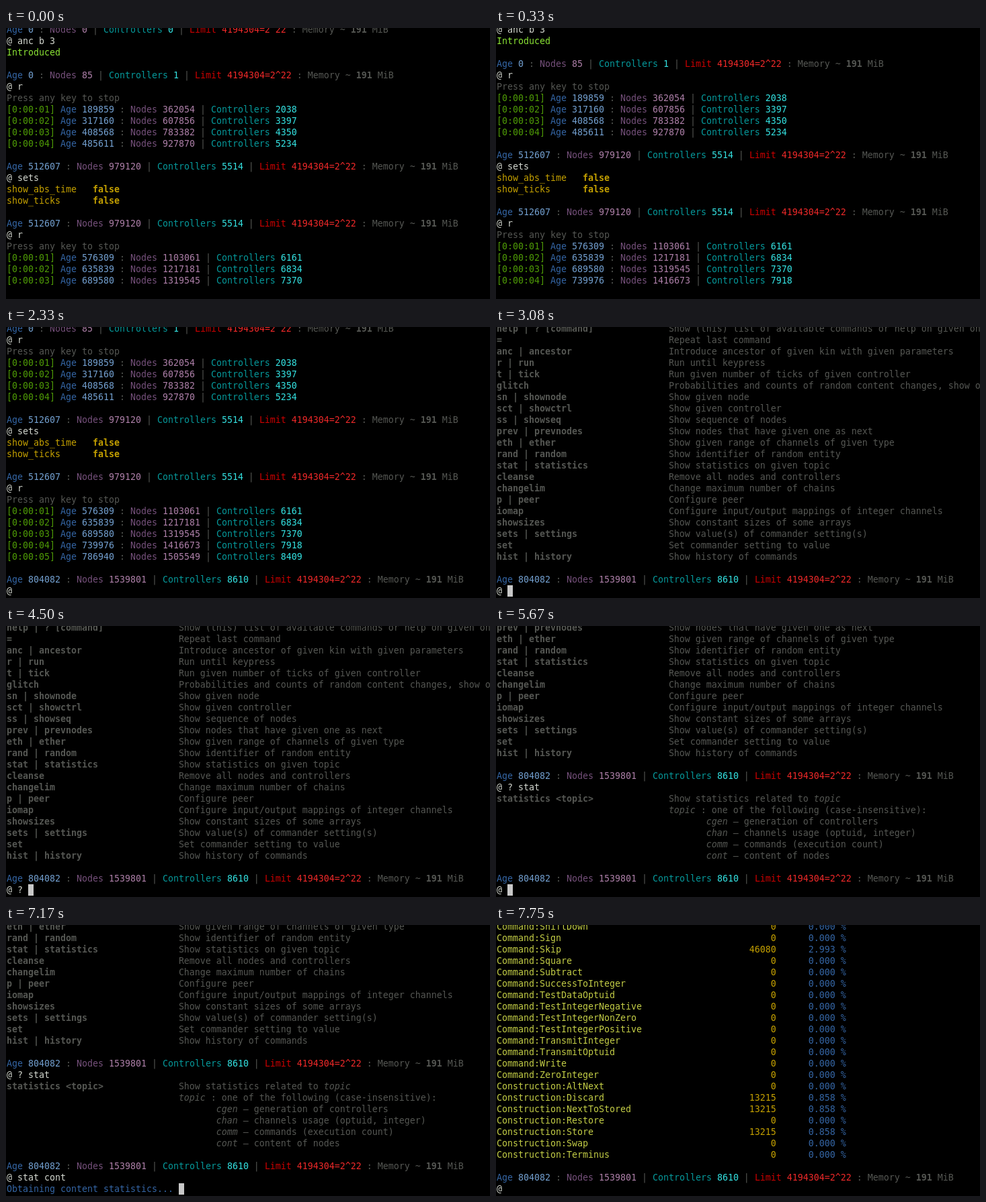
Recreate the animation shown at these times as an HTML page. Size 720 by 404 pixels, loop 8000 ms.

```html
<!DOCTYPE html>
<html lang="en">
<head>
<meta charset="utf-8">
<title>Terminal session</title>
<style>
  html, body { margin: 0; width: 100%; height: 100%; overflow: hidden; background: #000; }
  #stage { position: relative; width: 100%; height: 100%; overflow: hidden; contain: strict; }
  #screen {
    position: absolute; left: 1px; top: -6px; margin: 0;
    /* size whose advance is a whole 8px cell */
    font: 13.297px/17px "DejaVu Sans Mono", monospace;
    font-variant-ligatures: none; font-kerning: none;
    white-space: pre; color: #d3d7cf;
  }
  #screen div { height: 17px; }
  .grey, .key, .em { color: #555753; }
  .key { font-weight: bold; }
  .em { font-style: italic; }
  .blue { color: #3465a4; }     .sky { color: #729fcf; }
  .purple { color: #75507b; }   .lilac { color: #ad7fa8; }
  .teal { color: #06989a; }     .cyan { color: #34e2e2; }
  .maroon { color: #cc0000; }   .red { color: #ef2929; }
  .green { color: #4e9a06; }    .lime { color: #8ae234; }
  .gold { color: #c4a000; }     .name { color: #c3cd46; }
  .flag { color: #c4a000; font-weight: bold; }
  .cursor {
    display: inline-block; width: 8px; height: 17px;
    vertical-align: top; background: #c8c8c8;
  }
</style>
</head>
<body>
<div id="stage"><pre id="screen"></pre></div>
<script>
const LOOP = 8000, ROWS = 24;
const terminal = document.getElementById("screen");

const paint = (cls, text) =>
  `<span class="${cls}">${String(text).replace(/</g, "&lt;")}</span>`;
const grey = text => paint("grey", text);

// Line builders
const counts = (age, nodes, controllers) =>
  paint("blue", "Age ") + paint("sky", age) + grey(" : ") +
  paint("purple", "Nodes ") + paint("lilac", nodes) + grey(" | ") +
  paint("teal", "Controllers ") + paint("cyan", controllers);
const status = (...values) =>
  counts(...values) + grey(" | ") + paint("maroon", "Limit ") +
  paint("red", "4194304=2^22") + grey(" : Memory ~ ") + paint("key", 191) + grey(" MiB");
const tick = (second, ...values) => paint("green", `[0:00:0${second}] `) + counts(...values);
const setting = name => paint("gold", name.padEnd(16)) + paint("flag", "false");
const help = (key, text) => paint("key", key.padEnd(32)) + grey(text);
const topic = (name, text) => " ".repeat(39) + paint("em", name) + grey(" — " + text);
const stat = (name, count = 0, share = "0.000") =>
  paint("name", name) + paint("gold", String(count).padStart(52 - name.length)) +
  paint("blue", " ".repeat(6) + share + " %");
const input = (typed = "") => "@ " + typed;

const log = [];
const print = (...lines) => log.push(...lines);   // returns the new line count

const paused = status(512607, 979120, 5514);
const stopped = status(804082, 1539801, 8610);
const running = grey("Press any key to stop");

const run3 = print(
  status(0, 0, 0), input("anc b 3"), paint("lime", "Introduced"), "",
  status(0, 85, 1), input("r"), running,
  tick(1, 189859, 362054, 2038), tick(2, 317160, 607856, 3397),
  tick(3, 408568, 783382, 4350), tick(4, 485611, 927870, 5234), "",
  paused, input("sets"), setting("show_abs_time"), setting("show_ticks"), "",
  paused, input("r"), running,
  tick(1, 576309, 1103061, 6161), tick(2, 635839, 1217181, 6834),
  tick(3, 689580, 1319545, 7370));
const run4 = print(tick(4, 739976, 1416673, 7918));
const run5 = print(tick(5, 786940, 1505549, 8409));
const halted = print("", stopped);

const helped = print(input("?"), ...[
  ["help | ? [command]", "Show (this) list of available commands or help on given one"],
  ["=", "Repeat last command"],
  ["anc | ancestor", "Introduce ancestor of given kin with given parameters"],
  ["r | run", "Run until keypress"],
  ["t | tick", "Run given number of ticks of given controller"],
  ["glitch", "Probabilities and counts of random content changes, show or set"],
  ["sn | shownode", "Show given node"],
  ["sct | showctrl", "Show given controller"],
  ["ss | showseq", "Show sequence of nodes"],
  ["prev | prevnodes", "Show nodes that have given one as next"],
  ["eth | ether", "Show given range of channels of given type"],
  ["rand | random", "Show identifier of random entity"],
  ["stat | statistics", "Show statistics on given topic"],
  ["cleanse", "Remove all nodes and controllers"],
  ["changelim", "Change maximum number of chains"],
  ["p | peer", "Configure peer"],
  ["iomap", "Configure input/output mappings of integer channels"],
  ["showsizes", "Show constant sizes of some arrays"],
  ["sets | settings", "Show value(s) of commander setting(s)"],
  ["set", "Set commander setting to value"],
  ["hist | history", "Show history of commands"]
].map(row => help(...row)), "", stopped);

const explained = print(input("? stat"),
  help("statistics <topic>", "Show statistics related to ") + paint("em", "topic"),
  " ".repeat(32) + paint("em", "topic") + grey(" : one of the following (case-insensitive):"),
  topic("cgen", "generation of controllers"),
  topic("chan", "channels usage (optuid, integer)"),
  topic("comm", "commands (execution count)"),
  topic("cont", "content of nodes"), "", stopped);

const asked = print(input("stat cont"));

const commands = ("ShiftDown Sign Skip Square Subtract SuccessToInteger TestDataOptuid " +
  "TestIntegerNegative TestIntegerNonZero TestIntegerPositive TransmitInteger " +
  "TransmitOptuid Write ZeroInteger").split(" ");
const constructions = "AltNext Discard NextToStored Restore Store Swap Terminus".split(" ");
const used = { Skip: [46080, "2.993"] };
for (const name of ["Discard", "NextToStored", "Store"]) used[name] = [13215, "0.858"];
const group = (prefix, names) => names.map(name => stat(prefix + name, ...(used[name] || [])));
const listed = print(...group("Command:", commands),
  ...group("Construction:", constructions), "", stopped);

// [start ms, log lines shown, bottom line, cursor shown]
const steps = [
  [0, run3, "", false],
  [330, run4, "", false],
  [1330, run5, "", false],
  [1750, halted, input(), true],
  [2330, halted, input(), false],
  [2670, halted, input(), true],
  [2830, halted, input("?"), true],
  [3080, helped, input(), true],
  [3750, helped, input(), false],
  [4250, helped, input(), true],
  [4330, helped, input("?"), true],
  [4500, helped, input("? "), true],
  [5000, helped, input("? s"), true],
  [5080, helped, input("? sta"), true],
  [5170, helped, input("? stat"), true],
  [5670, explained, input(), true],
  [6170, explained, input("s"), true],
  [6250, explained, input("sta"), true],
  [6330, explained, input("stat"), true],
  [6500, explained, input("stat "), true],
  [6670, explained, input("stat c"), true],
  [6750, explained, input("stat co"), true],
  [6920, explained, input("stat con"), true],
  [7000, explained, input("stat cont"), true],
  [7170, asked, paint("blue", "Obtaining content statistics... "), true],
  [7250, listed, input(), true],
  [7750, listed, input(), false]
];

let shown;
function draw(time) {
  const step = steps.findLast(([start]) => start <= time);
  if (step === shown) return;
  shown = step;
  const [, count, bottom, cursor] = step;
  const lines = log.slice(count - ROWS + 1, count);
  lines.push(bottom + (cursor ? '<span class="cursor"></span>' : ""));
  terminal.innerHTML = lines.map(line => `<div>${line}</div>`).join("");
}

const began = performance.now();
function frame() {
  draw((performance.now() - began) % LOOP);
  requestAnimationFrame(frame);
}
frame();
</script>
</body>
</html>
```
